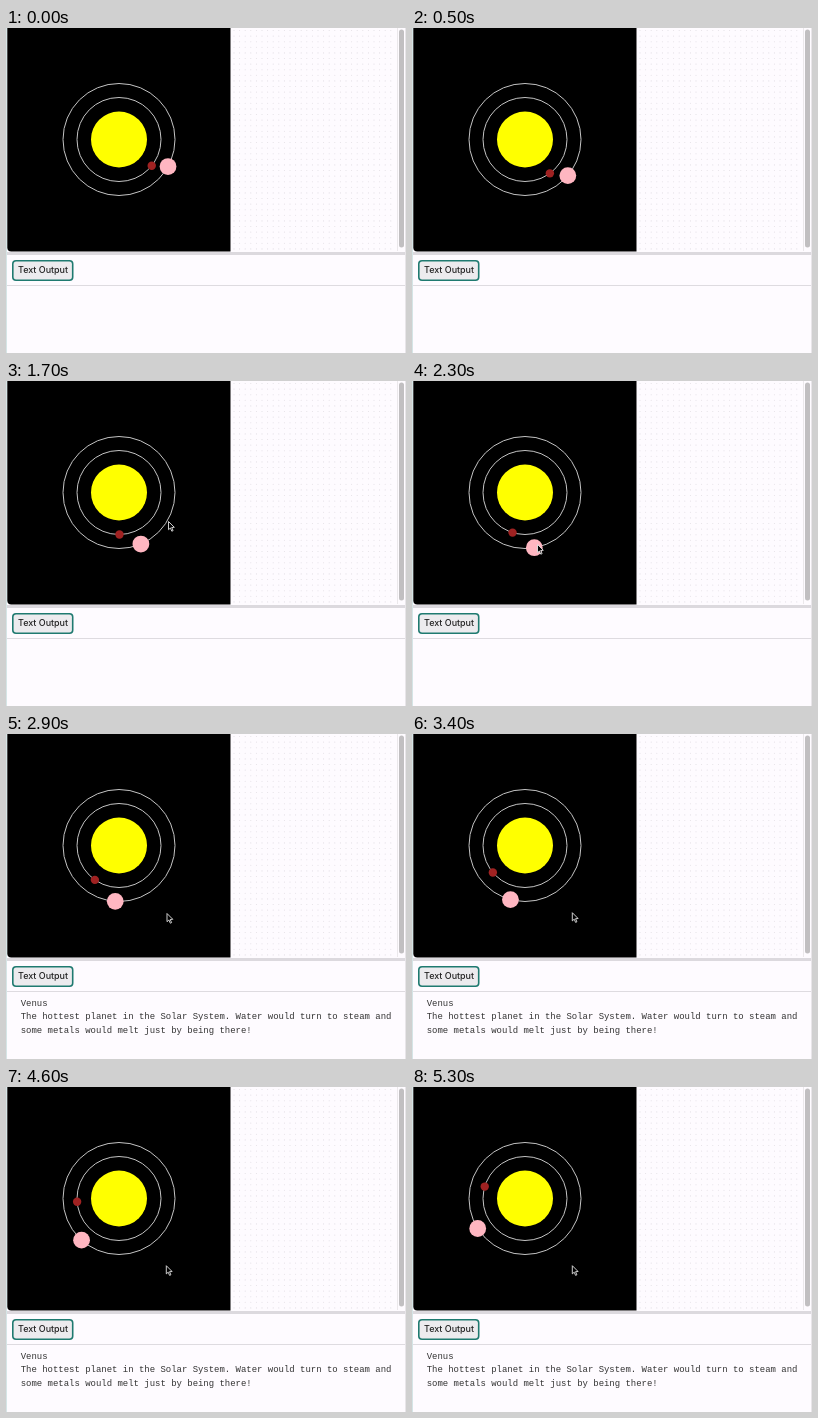
An HTML page with a canvas for the animation above (5400 ms loop, 400x325 px).

```html
<!DOCTYPE html>
<html lang="en">
<head>
<meta charset="utf-8">
<title>Orbits</title>
<style>
html, body { margin: 0; width: 100%; height: 100%; overflow: hidden; background: #fefbff; }
canvas { display: block; width: 400px; height: 325px; }
</style>
</head>
<body>
<canvas id="stage" width="400" height="325"></canvas>
<script>
const ctx = document.getElementById('stage').getContext('2d');
const LOOP = 5400, STEP = 100, SCALE = 0.56;
const CENTER = { x: 113, y: 111.5 };
const INFO = [
  'Venus',
  'The hottest planet in the Solar System. Water would turn to steam and',
  'some metals would melt just by being there!'
];
const TEXT_TIME = 2400;

// Pointer path: time, x, y
const POINTER = [
  [1200, 150, 318], [1400, 165, 225], [1600, 173, 132], [1800, 152, 149],
  [2100, 130, 162], [2300, 125.5, 163.5], [2400, 126, 164],
  [2800, 161, 179.5], [3100, 161, 179.5], [3400, 160.3, 178.7]
];

function rect(x, y, w, h, color) {
  ctx.fillStyle = color;
  ctx.fillRect(x, y, w, h);
}

function rounded(x, y, w, h, radius, color) {
  ctx.beginPath();
  ctx.roundRect(x, y, w, h, radius);
  ctx.fillStyle = color;
  ctx.fill();
}

function circle(x, y, radius) {
  ctx.beginPath();
  ctx.arc(x, y, radius, 0, Math.PI * 2);
}

function disc(x, y, radius, color) {
  circle(x, y, radius);
  ctx.fillStyle = color;
  ctx.fill();
}

function orbit(radius) {
  circle(CENTER.x, CENTER.y, radius);
  ctx.lineWidth = 1;
  ctx.strokeStyle = '#c4c4c4';
  ctx.stroke();
}

function planet(orbitRadius, size, degrees, color) {
  const angle = degrees * Math.PI / 180;
  disc(CENTER.x + orbitRadius * Math.cos(angle),
       CENTER.y + orbitRadius * Math.sin(angle), size, color);
}

function label(text, x, y, font, color) {
  ctx.font = font;
  ctx.fillStyle = color;
  ctx.fillText(text, x, y);
}

function drawWorkspace() {
  rect(0, 0, 400, 325, '#fefbff');
  const gap = 10 * SCALE;
  for (let y = 2.5; y < 222; y += gap)
    for (let x = 228; x < 390; x += gap) disc(x, y, 0.55, '#e2dee4');

  rect(391, 0, 1, 223, '#ebe8eb');
  rounded(393, 1.5, 5, 218, 2.5, '#c1bfc1');
  rounded(1.3, -6, 223.2, 229.4, [0, 0, 0, 4], '#000');
  rect(0, 224, 400, 3, '#dcd9de');
  rect(0, 257, 400, 1, '#dedbe0');
  rect(0, 0, 1, 325, '#d5e5e6');
  rect(399, 0, 1, 325, '#e8e5e9');
}

function drawButton() {
  rounded(6, 232, 61.5, 21, 4, '#1f7a70');
  rounded(7.6, 233.6, 58.3, 17.8, 2.6, '#ecebee');
  label('Text Output', 12, 245.3, '500 8.96px Inter, sans-serif', '#222');
}

function pointerAt(time) {
  if (time < POINTER[0][0]) return null;
  const next = POINTER.findIndex(p => p[0] > time);
  if (next < 0) return POINTER[POINTER.length - 1].slice(1);
  const a = POINTER[next - 1], b = POINTER[next];
  const k = (time - a[0]) / (b[0] - a[0]);
  return [a[1] + (b[1] - a[1]) * k, a[2] + (b[2] - a[2]) * k];
}

function drawPointer([x, y]) {
  const shape = [[0, 0], [0, 8.2], [1.9, 6.5], [3.3, 9.7], [4.6, 9.1], [3.2, 6], [5.8, 5.8]];
  ctx.beginPath();
  shape.forEach(([dx, dy]) => ctx.lineTo(x + dx, y + dy));
  ctx.closePath();
  ctx.fillStyle = '#000';
  ctx.fill();
  ctx.lineWidth = 0.9;
  ctx.lineJoin = 'round';
  ctx.strokeStyle = '#e4e4e4';
  ctx.stroke();
}

function draw(time) {
  drawWorkspace();
  drawButton();

  orbit(100 * SCALE);
  orbit(75 * SCALE);
  disc(CENTER.x, CENTER.y, 50 * SCALE, '#ffff00');
  planet(75 * SCALE, 7.5 * SCALE, 38.8 + 0.02975 * time, '#a02222');
  planet(100 * SCALE, 15 * SCALE, 28.9 + 0.0224 * time, '#ffb6c1');

  if (time >= TEXT_TIME) {
    INFO.forEach((line, i) => label(line, 14.7, 271.8 + 24 * SCALE * i,
      '8.96px "Liberation Mono", monospace', '#333'));
  }
  const pointer = pointerAt(time);
  if (pointer) drawPointer(pointer);
}

const start = performance.now();
function tick() {
  const elapsed = (performance.now() - start) % LOOP;
  draw(Math.floor(elapsed / STEP) * STEP);
  requestAnimationFrame(tick);
}
tick();
</script>
</body>
</html>
```
